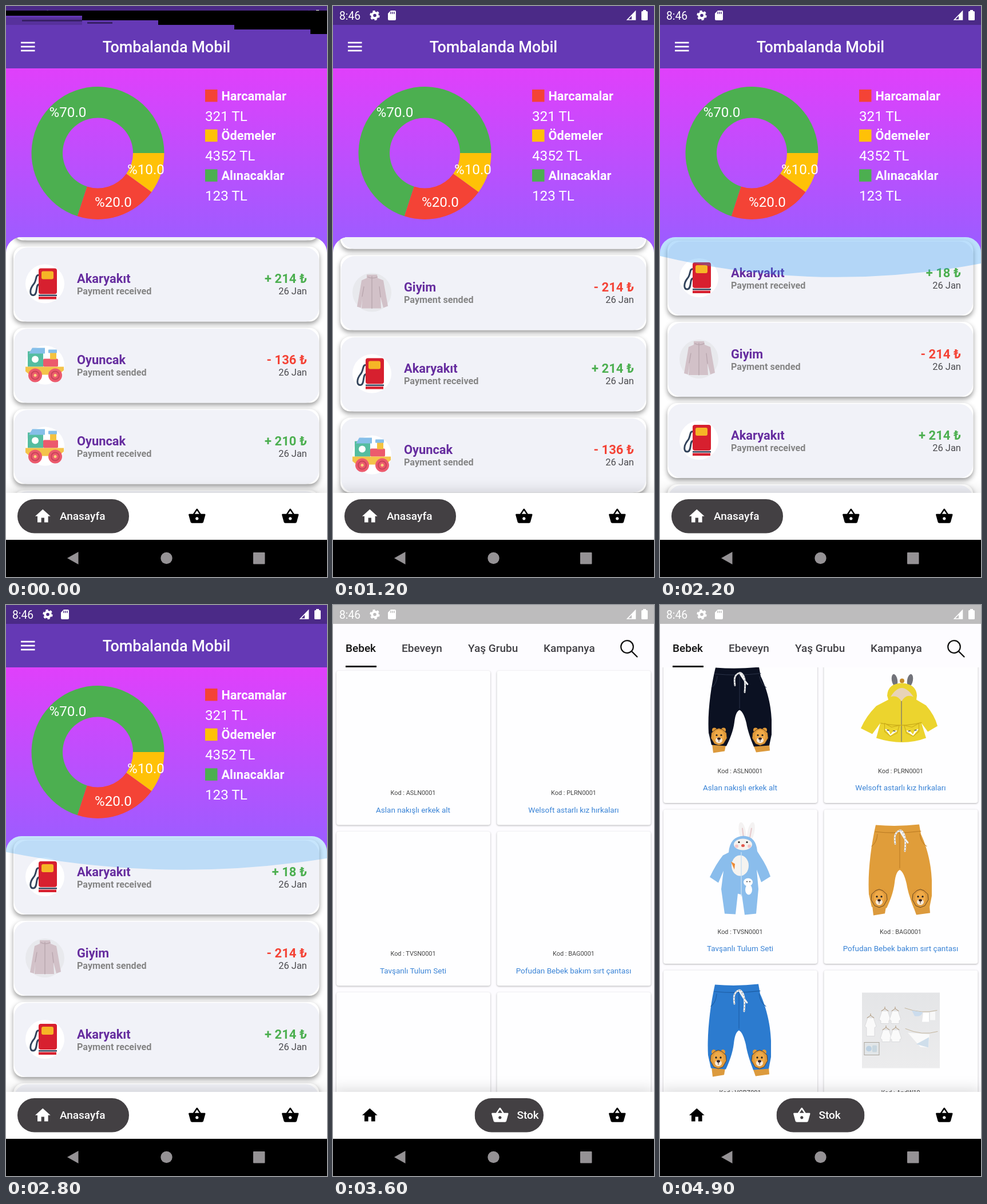
Animation of 561 by 998 pixels, one loop 5 s. Source, as an HTML page:

```html
<!DOCTYPE html>
<html lang="tr">
<head>
<meta charset="utf-8">
<title>Mobil</title>
<style>
html, body { margin: 0; width: 100%; height: 100%; overflow: hidden; background: #000; }
#stage { display: block; width: 100%; height: 100%; font-family: Roboto, "Noto Sans", sans-serif; }
.card { filter: drop-shadow(0 4px 4px rgba(0, 0, 0, .4)); }
.tile { filter: drop-shadow(0 1px 1.5px rgba(0, 0, 0, .3)); }
.bar { filter: drop-shadow(0 -3px 12px rgba(0, 0, 0, .15)); }
</style>
</head>
<body>
<svg id="stage" viewBox="0 0 561 998"></svg>
<script>
const LOOP = 5000, STEP = 100;
const GREEN = '#4caf50', RED = '#f44336', AMBER = '#ffc107';

// Small markup helpers
const rect = (x, y, w, h, fill, r = 0, more = '') =>
  `<rect x="${x}" y="${y}" width="${w}" height="${h}" rx="${r}" fill="${fill}" ${more}/>`;
const disc = (x, y, r, fill, more = '') => `<circle cx="${x}" cy="${y}" r="${r}" fill="${fill}" ${more}/>`;
const oval = (x, y, rx, ry, fill, more = '') =>
  `<ellipse cx="${x}" cy="${y}" rx="${rx}" ry="${ry}" fill="${fill}" ${more}/>`;
const path = (d, fill, more = '') => `<path d="${d}" fill="${fill}" ${more}/>`;
const line = (d, color, w, more = '') =>
  path(d, 'none', `stroke="${color}" stroke-width="${w}" stroke-linecap="round" ${more}`);
const text = (s, x, y, size, fill, weight = 400, anchor = 'start') =>
  `<text x="${x}" y="${y}" font-size="${size}" fill="${fill}" font-weight="${weight}" text-anchor="${anchor}">${s}</text>`;
const group = (x, y, body, scale = '1') => `<g transform="translate(${x} ${y}) scale(${scale})">${body}</g>`;

// Status bar
const statusBar = back => rect(0, 0, 561, 33, back)
  + text('8:46', 11, 24, 19.3, '#fff')
  + disc(73, 16.5, 4.8, 'none', 'stroke="#fff" stroke-width="4"')
  + disc(73, 16.5, 7.2, 'none', 'stroke="#fff" stroke-width="3" stroke-dasharray="4 3.54"')
  + path('M101 8H108Q110 8 110 10V23Q110 25 108 25H98Q96 25 96 23V13Z', '#fff')
  + [101, 104, 107].map(x => rect(x - .7, 10, 1.4, 4, back)).join('')
  + path('M514.5 24H528.5V9.5Z', 'none', 'stroke="#fff" stroke-width="1.6"')
  + path('M522 24V16L528.5 9.5V24Z', '#fff')
  + rect(539, 9, 11, 16, '#fff', 1.5) + rect(542, 7, 5, 3, '#fff');

// Chart
const polar = (r, deg) => {
  const a = deg * Math.PI / 180;
  return `${160.5 + r * Math.cos(a)} ${257 + r * Math.sin(a)}`;
};
const slice = (from, to, fill) => {
  const big = to - from > 180 ? 1 : 0;
  return path(`M${polar(116, from)}A116 116 0 ${big} 1 ${polar(116, to)}L${polar(61.5, to)}A61.5 61.5 0 ${big} 0 ${polar(61.5, from)}Z`, fill);
};
const chart = slice(0, 36, AMBER) + slice(36, 108, RED) + slice(108, 360, GREEN)
  + [['%70.0', 108, 194], ['%10.0', 244.5, 293.5], ['%20.0', 187.5, 350.5]]
    .map(([s, x, y]) => text(s, x, y, 24.2, '#fff', 400, 'middle')).join('');
const legend = [['Harcamalar', '321 TL', RED], ['Ödemeler', '4352 TL', AMBER], ['Alınacaklar', '123 TL', GREEN]]
  .map(([name, sum, color], i) => group(348, 146 + 69.7 * i,
    rect(0, 0, 21.5, 21.5, color) + text(name, 28.5, 18.5, 21.7, '#fff', 700)
    + text(sum, 0, 54.5, 24.2, '#fff'))).join('');

// Round list pictures, centred on 0,0
const pump = disc(0, 0, 34, '#fff')
  + line('M-10 -15C-17 -17 -14 -5 -20 1C-27 10 -27 20 -20 20C-12 19 -17 1 -10 1', '#33445c', 3)
  + rect(-11, -27, 32, 45, '#d7202f', 4) + rect(-6, -22, 21, 14, '#f6b526', 3)
  + rect(-11, 19, 32, 2.5, '#33445c') + rect(-11, 22.5, 31, 4.5, '#d7202f');
const wheel = x => disc(x, 18, 12, '#ec5a6d') + disc(x, 18, 7, 'none', 'stroke="#c94459" stroke-width="2"')
  + disc(x, 18, 2.5, '#f9d27a');
const train = disc(0, 0, 34, '#fff')
  + rect(-30, -24, 27, 27, '#55bda0') + path('M-28 -20L-22 -30H0V-20Z', '#86bfe9')
  + disc(-17, -10, 6, '#fff') + rect(-3, -11, 26, 14, '#ec5a6d', 2)
  + rect(9, -22, 11, 12, '#f4c23f') + rect(6, -27, 15, 6, '#86bfe9', 1)
  + path('M-34 3H33V9L24 17H-27L-34 11Z', '#f4c34a') + wheel(-17) + wheel(18);
const jacket = disc(0, 0, 34, '#e8e9ed')
  + path('M-9 -31H9L10 -25L20 -21L28 24L20 27L15 8L16 28H-18L-17 10L-19 27L-26 25L-18 -21L-9 -25Z', '#d2c1c8')
  + line('M0 -28V28M-17 7L-14 -10M15 8L13 -10', '#b5a2aa', 1.2)
  + line('M-7 -27Q1 -23 9 -27', '#bba8b0', 1.5);

// Payment list
const payments = [
  ['Akaryakıt', '+ 18', pump], ['Giyim', '- 214', jacket], ['Akaryakıt', '+ 214', pump],
  ['Oyuncak', '- 136', train], ['Oyuncak', '+ 210', train], ['Giyim', '- 214', jacket]];
const payCard = ([name, sum, icon], i) => {
  const plus = sum[0] === '+';
  return group(0, 410 + 142 * i,
    rect(13, 0, 534.5, 131, '#fff', 17, 'class="card"') + rect(14, 1.5, 533, 129.5, '#f1f2f8', 24)
    + group(68, 65, icon)
    + text(name, 124, 63.7, 21.8, '#662d9f', 700)
    + text('Payment ' + (plus ? 'received' : 'sended'), 124, 83.7, 16.2, '#858585', 700)
    + text(sum + ' ₺', 526, 63.7, 22, plus ? GREEN : RED, 700, 'end')
    + text('26 Jan', 526, 83.7, 16.5, '#4c4c50', 400, 'end'));
};

const home = statusBar('#4b2a87') + rect(0, 33, 561, 76, '#6539b5')
  + [64, 71, 78].map(y => rect(26, y - 1.3, 24.5, 2.7, '#fff')).join('')
  + text('Tombalanda Mobil', 280.5, 81, 27, '#fff', 500, 'middle')
  + rect(0, 109, 561, 360, 'url(#sky)') + chart + legend
  + `<g clip-path="url(#panel)">${rect(0, 404, 561, 460, '#fff')}
    <g id="list">${payments.map(payCard).join('')}</g>
    <g id="glow">${path('M0 0H561V46Q280 99.5 0 33Z', '#2196f3')}</g></g>`;

// Product drawings
const lion = (x, y) => group(x, y,
  disc(-8, -11, 4, '#e09a3a') + disc(8, -11, 4, '#e09a3a')
  + path('M-13 -6L-6 -12L0 -14L6 -12L13 -6L14 3L8 13L0 16L-8 13L-14 3Z', '#e09a3a', 'stroke="#4a321c" stroke-width=".8"')
  + oval(0, 0, 9, 11, '#f0aa48') + oval(0, 7, 6, 5, '#f6e8d6')
  + disc(-4, -2, 1.6, '#222') + disc(4, -2, 1.6, '#222') + oval(0, 4, 3, 2, '#3a2420')
  + line('M0 5V9', '#3a2420', 1));
const pants = (fill, seam) =>
  path('M-49 134L-25 136L-27 147L-47 150ZM51 134L23 136L28 149L52 146Z', '#dc9a3d')
  + path('M-43 1Q-5 4 33 0L36 16C45 34 54 62 55 92L55 118L51 137L24 139C18 125 13 110 11 98Q6 78 -1 75Q-8 78 -10 96C-12 112 -18 126 -24 138L-50 136L-55 115C-57 82 -52 38 -43 1Z', fill)
  + line('M-44 12Q-5 16 36 11M-1 15V72M-40 16Q-41 30 -50 36M34 16Q36 30 46 36', seam, 1)
  + line('M-1 10C-12 14 -10 24 -9 32M1 10C8 14 10 24 8 44M-1 10Q6 22 13 30', '#f2f2f2', 2.8)
  + line('M-1 10C-12 14 -10 24 -9 32M1 10C8 14 10 24 8 44', '#777', 1, 'stroke-dasharray="1 4"')
  + lion(-37, 121) + lion(35, 121);
const fox = (x, tilt) => `<g transform="translate(${x} 98) rotate(${tilt})">${
  path('M-13 -10L0 -5L13 -10L11 4L0 11L-11 4Z', '#ecd42e', 'stroke="#c9a817"')
  + path('M-11 0Q-5 -2 0 8Q5 -2 11 0L0 10Z', '#fff') + line('M-7 1H-4M4 1H7', '#555', 1.5)}</g>`;
const hoodie = oval(-10, 11, 5, 11, '#72737a', 'transform="rotate(-10 -10 11)"')
  + oval(17, 11, 5, 11, '#72737a', 'transform="rotate(10 17 11)"')
  + path('M-23 38Q-22 16 4 16Q28 18 29 38L28 45L45 55Q60 72 65 91L48 101L37 86L45 112Q5 127 -42 112L-35 86L-49 105L-69 95Q-60 74 -42 56L-21 45Z', '#ecd42e')
  + path('M-17 40Q2 9 23 40Q10 34 2 48Q-5 36 -17 40Z', '#e8d3b8')
  + disc(3, 12, 4, '#c58a2b')
  + line('M2 48V118', '#88806a', 1.5) + line('M-34 86Q2 94 37 85', '#cdb01b', 1.5)
  + fox(-16, 8) + fox(21, -8);
const bunny = oval(4, 16, 6, 17, '#f4f2f2', 'transform="rotate(-10 4 16)"')
  + oval(19, 16, 6, 17, '#f4f2f2', 'transform="rotate(12 19 16)"')
  + line('M4 10L6 26M20 10L17 26', '#e7c9cc', 2)
  + path('M-20 52Q-18 24 6 23Q28 24 30 50L35 58Q47 76 53 94L37 104L29 82L32 116L28 159L8 161L3 126L-4 124L-8 160L-27 159L-33 116L-29 84L-38 105L-53 95Q-42 72 -30 57Z', '#8abdec')
  + oval(5, 38, 16, 10, '#f6f2ee') + disc(-2, 34, 1.6, '#222') + disc(12, 34, 1.6, '#222')
  + oval(5, 40, 3, 2.5, '#e2574c') + disc(-6, 41, 3, '#f5c5c5') + disc(16, 41, 3, '#f5c5c5')
  + oval(0, 75, 15, 18, '#f5f3f0') + line('M2 52V128', '#c7dff3', 1.4)
  + path('M-16 68L-9 72L-10 82Z', '#ee8a34')
  + oval(14, 104, 8, 7, '#fff') + oval(15, 117, 6, 9, '#fff') + disc(12, 103, 1, '#333') + disc(17, 103, 1, '#333');
const shirt = (x, y, h) => path(`M${x - 5} ${y}H${x + 5}L${x + 10} ${y + 15}L${x + 7} ${y + 17}V${y + h}H${x - 7}V${y + 17}L${x - 10} ${y + 15}Z`, '#fafafa', 'stroke="#d2d2d5" stroke-width=".7"')
  + line(`M${x - 6} ${y}L${x} ${y - 4}L${x + 6} ${y}M${x} ${y - 4}V${y - 7}`, '#ab9273', 1);
const photo = rect(0, 0, 136, 132, 'url(#wall)')
  + shirt(15, 44, 32) + shirt(40, 32, 22) + shirt(58, 32, 22) + shirt(42, 65, 21) + shirt(59, 65, 21)
  + line('M75 27Q105 38 131 31M76 63Q105 76 132 68', '#c3b49b', 1)
  + path('M87 31L106 34Q104 43 92 41Z', '#cbdced') + path('M107 35H117V51H105Z', '#fff') + path('M119 34L128 33V48H119Z', '#f8f8f8')
  + path('M80 70L118 73L116 96L102 95Z', '#fafafa') + path('M95 90L117 78L116 96Z', '#cfdeeb')
  + rect(4, 87, 26, 22, '#e2e6e8', 0, 'stroke="#aaa49b" stroke-width="1"')
  + disc(12, 98, 5, '#bdd1e2') + rect(18, 92, 8, 12, '#c9d7df', 2);

// Product grid: code, label, drawing, x, y, scale
const goods = [
  ['ASLN0001', 'Aslan nakışlı erkek alt', pants('#0b1122', '#2b3348'), 140, 147, '1'],
  ['PLRN0001', 'Welsoft astarlı kız hırkaları', hoodie, 420, 159, '1'],
  ['TVSN0001', 'Tavşanlı Tulum Seti', bunny, 140, 419, '1'],
  ['BAG0001', 'Pofudan Bebek bakım sırt çantası', pants('#e09d3a', '#b97a22'), 420, 422, '1 1.06'],
  ['VGBZ001', 'Aslan nakışlı mavi alt', pants('#2c7bcf', '#1c5ca3'), 139, 701, '1 1.08'],
  ['AndW10', 'Bebek hastane çıkışı', photo, 353, 716, '1']];
const tile = ([code, label, art, x, y, scale], i) => {
  const left = i % 2 ? 286.5 : 6, top = 115 + 281 * (i >> 1), mid = left + 134;
  return rect(left, top, 269, 269.5, '#fefeff', 4, 'class="tile"')
    + `<g class="art">${group(x, y, art, scale)}</g>`
    + text('Kod : ' + code, mid, top + 217, 10.9, '#444', 400, 'middle')
    + text(label, mid, top + 247.5, 13.5, '#3b84d6', 400, 'middle');
};
const shop = rect(0, 0, 561, 860, '#fdfcff')
  + `<g clip-path="url(#grid)"><g id="goods">${goods.map(tile).join('')}</g></g>`
  + statusBar('#bdbcbd')
  + [['Bebek', 22, '#111'], ['Ebeveyn', 120, '#424146'], ['Yaş Grubu', 236, '#424146'], ['Kampanya', 368, '#424146']]
    .map(([s, x, c]) => text(s, x, 82.3, 19, c, 500)).join('')
  + rect(22, 106, 54, 3, '#111')
  + disc(514, 73, 10.8, 'none', 'stroke="#111" stroke-width="2.2"') + line('M522 81L531.5 90.5', '#111', 2.4);

// Bottom navigation
const HOUSE = 'M10 20v-6h4v6h5v-8h3L12 3 2 12h3v8z';
const BASKET = 'M17.21 9l-4.38-6.56c-.19-.28-.51-.42-.83-.42-.32 0-.64.14-.83.43L6.79 9H2c-.55 0-1 .45-1 1 0 .09.01.18.04.27l2.54 9.27c.23.84 1 1.46 1.92 1.46h13c.92 0 1.69-.62 1.93-1.46l2.54-9.27L23 10c0-.55-.45-1-1-1h-4.79zM9 9l3-4.4L15 9H9zm3 8c-1.1 0-2-.9-2-2s.9-2 2-2 2 .9 2 2-.9 2-2 2z';
const tab = (icon, label) => `<svg class="tab" y="862" height="60" width="88.5">
  <rect class="pill" width="88.5" height="59.5" rx="29.75" fill="#434043"/>
  ${group(28.3, 13.8, `<path class="icon" d="${icon}"/>`, '1.333')}
  <g class="label">${text(label, 74, 36.3, 19, '#fff', 500)}</g></svg>`;
const navBar = rect(0, 851, 561, 83, '#fff', 0, 'class="bar"')
  + tab(HOUSE, 'Anasayfa') + tab(BASKET, 'Stok') + tab(BASKET, '')
  + rect(0, 933, 561, 65, '#000')
  + path('M107 965L126.5 954V976Z', '#959295') + disc(280.5, 965, 10.2, '#959295') + rect(432, 955, 20.5, 20.5, '#959295', 1);

// Partly painted top on start
const torn = rect(0, 8, 561, 25, '#6539b5')
  + path('M0 8H561V49H532V41H399V33H266V25H133V17H0Z', '#000')
  + rect(0, 20, 133, 13, '#57319c') + rect(28, 24, 105, 3, '#371f66') + rect(142, 28, 44, 3, '#371f66');

const stage = document.getElementById('stage');
stage.innerHTML = `<defs>
  <linearGradient id="sky" gradientUnits="userSpaceOnUse" x1="0" y1="109" x2="0" y2="404">
    <stop stop-color="#e040fb"/><stop offset="1" stop-color="#9f5bff"/></linearGradient>
  <linearGradient id="wall" x2="0" y2="1"><stop stop-color="#e4e5e7"/><stop offset="1" stop-color="#ececed"/></linearGradient>
  <clipPath id="panel"><rect y="404" width="561" height="520" rx="27"/></clipPath>
  <clipPath id="grid"><rect y="109" width="561" height="742"/></clipPath></defs>
  <g id="home">${home}</g><g id="shop">${shop}</g>${navBar}<g id="torn">${torn}</g>`;

const el = id => document.getElementById(id);
const show = (node, on) => { node.style.display = on ? '' : 'none'; };
const tabs = [...stage.querySelectorAll('.tab')];
const art = [...stage.querySelectorAll('.art')];

// Value of a [time, value] track
const at = (track, t) => {
  const i = track.findIndex(k => k[0] > t);
  if (i === 0) return track[0][1];
  if (i < 0) return track[track.length - 1][1];
  const [t0, a] = track[i - 1], [t1, b] = track[i];
  return a + (b - a) * (t - t0) / (t1 - t0);
};
const listScroll = [[0, 273.5], [700, 182.5], [1600, 63.5], [2050, 0]];
const glowSize = [[2000, 0], [2200, 1], [2700, .95], [3400, .19], [3500, 0]];
const glowFade = [[2000, 0], [2200, .3], [2700, .28], [3400, .08], [3500, 0]];
const shopScroll = [[4400, 0], [4900, 38.5], [5000, 46]];
const navShift = [[3500, 0], [4000, 1]];

function placeTabs(p) {
  const widths = [195 - 106.5 * p, 88.5 + 65.5 * p, 88.5];
  const gap = (521 - widths[0] - widths[1] - widths[2]) / 2;
  const lit = [Math.max(0, 1 - 2.1 * p), Math.min(1, 2.1 * p), 0];
  let x = 20;
  tabs.forEach((node, i) => {
    node.setAttribute('x', x);
    node.setAttribute('width', widths[i]);
    const pill = node.querySelector('.pill');
    pill.setAttribute('width', widths[i]);
    pill.setAttribute('opacity', lit[i]);
    node.querySelector('.label').setAttribute('opacity', lit[i]);
    const v = Math.round(255 * lit[i]);
    node.querySelector('.icon').setAttribute('fill', `rgb(${v},${v},${v})`);
    x += widths[i] + gap;
  });
}

function draw(now) {
  const t = Math.floor(now % LOOP / STEP) * STEP;
  const inShop = t >= 3600;
  show(el('home'), !inShop);
  show(el('shop'), inShop);
  show(el('torn'), t < 100);
  art.forEach(node => show(node, t >= 3700));
  el('list').setAttribute('transform', `translate(0 ${-at(listScroll, t)})`);
  el('glow').setAttribute('transform', `translate(0 404) scale(1 ${at(glowSize, t)})`);
  el('glow').setAttribute('opacity', at(glowFade, t));
  el('goods').setAttribute('transform', `translate(0 ${-at(shopScroll, t)})`);
  placeTabs(1 - (1 - at(navShift, t)) ** 3);
}

const start = performance.now();
const tick = () => {
  draw(performance.now() - start);
  requestAnimationFrame(tick);
};
tick();
</script>
</body>
</html>
```
